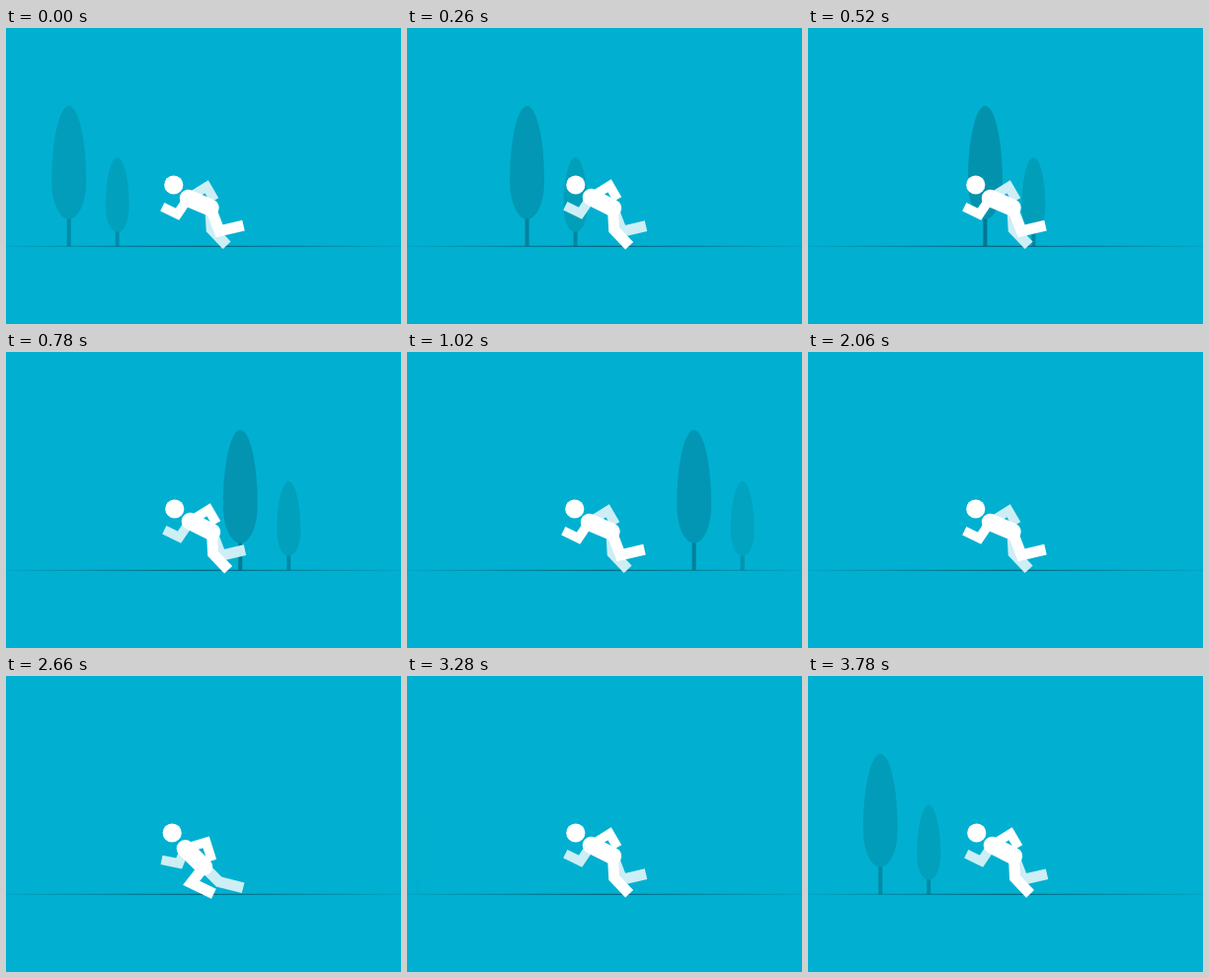
An HTML page with a canvas for the animation above (3800 ms loop, 400x300 px).

```html
<!DOCTYPE html>
<html lang="en">
<head>
<meta charset="utf-8">
<title>Runner</title>
<style>
  html, body { margin: 0; width: 100%; height: 100%; overflow: hidden; background: #01b0d0; }
  canvas { display: block; width: 400px; height: 300px; }
</style>
</head>
<body>
<canvas id="stage"></canvas>
<script>
const LOOP = 3800, STRIDE = 505, STRIDE_START = 30, REST = 0.06;
const SPEED = 0.2225, TREE_START = 63.5, TREE_SPAN = 831.5, TREE_GAP = 49;
const BACKGROUND = '#01b0d0', NEAR = '#ffffff', FAR = '#cdeef5';

// Four poses per stride: lift-off, passing, landing, pushing.
const TIMES = [0, 0.15, 0.5, 0.65, 1];
const BODY = {
  headX: [169.8, 168, 170.8, 168], headY: [159, 159, 159, 159],
  shoulderX: [184.5, 181, 186.5, 181], shoulderY: [172.5, 175, 171.5, 175],
  hipX: [207, 200, 208.5, 200], hipY: [182, 194, 182.5, 194]
};
// Each limb: upper angle and length, lower angle and length.
const ARM = [[124, -4, -32, 100], [19.5, 22, 22, 16.5], [206, 84, 60, 180], [17, 20, 16, 18]];
const LEG = [[69, 129, 87, 45], [25.5, 21, 22, 21], [-13, 20, 46.5, 20], [25, 25.5, 22.5, 25]];
const FADE = [[5, 0], [63, 0.62], [180, 1], [290, 0.83], [371, 0.53], [500, 0]];

const canvas = document.getElementById('stage');
const ctx = canvas.getContext('2d');
const ratio = window.devicePixelRatio || 1;
canvas.width = 400 * ratio;
canvas.height = 300 * ratio;
ctx.scale(ratio, ratio);

const ground = ctx.createLinearGradient(0, 0, 400, 0);
ground.addColorStop(0, 'rgba(0,82,104,0.1)');
ground.addColorStop(0.5, 'rgba(0,82,104,0.75)');
ground.addColorStop(1, 'rgba(0,82,104,0.1)');

// Pauses briefly at the two extremes of the stride.
function restAtExtremes(phase) {
  const half = Math.floor(phase * 2) / 2;
  const u = (phase - half - REST) / (0.5 - 2 * REST);
  return half + 0.5 * Math.min(1, Math.max(0, u));
}

// Hermite curve that is level at both extremes and flows through the other poses.
function pose(values, phase) {
  const p = phase - Math.floor(phase);
  let i = 0;
  while (p >= TIMES[i + 1]) i++;
  const a = values[i], b = values[(i + 1) % 4], before = values[(i + 3) % 4], after = values[(i + 2) % 4];
  const span = TIMES[i + 1] - TIMES[i], u = (p - TIMES[i]) / span;
  const slopeA = i % 2 ? (b - before) * span / 0.5 : 0;
  const slopeB = i % 2 ? 0 : (after - a) * span / 0.5;
  const s = u * u * (3 - 2 * u);
  return a + (b - a) * s + slopeA * u * (1 - u) * (1 - u) - slopeB * u * u * (1 - u);
}

function fade(x) {
  for (let i = 1; i < FADE.length; i++) {
    const [x0, a0] = FADE[i - 1], [x1, a1] = FADE[i];
    if (x >= x0 && x < x1) return a0 + (a1 - a0) * (x - x0) / (x1 - x0);
  }
  return 0;
}

function drawTree(x, top, widest, bottom, halfWidth, crown, trunk) {
  ctx.globalAlpha = fade(x);
  ctx.fillStyle = crown;
  ctx.beginPath();
  ctx.ellipse(x, widest, halfWidth, widest - top, 0, Math.PI, 2 * Math.PI);
  ctx.ellipse(x, widest, halfWidth, bottom - widest, 0, 0, Math.PI);
  ctx.fill();
  ctx.fillStyle = trunk;
  ctx.fillRect(x - 2, bottom - 0.5, 4, 221.5 - bottom);
  ctx.globalAlpha = 1;
}

function drawLimb(x, y, limb, phase, width, color) {
  const [upper, upperLength, lower, lowerLength] = limb.map(values => pose(values, phase));
  const step = (angle, length) => {
    x += Math.cos(angle * Math.PI / 180) * length;
    y += Math.sin(angle * Math.PI / 180) * length;
    ctx.lineTo(x, y);
  };
  ctx.strokeStyle = color;
  ctx.lineWidth = width;
  ctx.lineCap = 'butt';
  ctx.lineJoin = 'miter';
  ctx.beginPath();
  ctx.moveTo(x, y);
  step(upper, upperLength);
  step(lower, lowerLength);
  ctx.stroke();
}

function drawRunner(phase) {
  const at = name => pose(BODY[name], phase);
  const shoulder = [at('shoulderX'), at('shoulderY')];
  const hip = [at('hipX'), at('hipY')];
  const limbs = (offset, color) => {
    drawLimb(...hip, LEG, phase + offset, 11, color);
    drawLimb(...shoulder, ARM, phase + offset, 9.5, color);
  };
  limbs(0.5, FAR);
  limbs(0, NEAR);

  ctx.strokeStyle = ctx.fillStyle = NEAR;
  ctx.lineWidth = 17.5;
  ctx.lineCap = 'round';
  ctx.beginPath();
  ctx.moveTo(...shoulder);
  ctx.lineTo(...hip);
  ctx.stroke();
  ctx.beginPath();
  ctx.arc(at('headX'), at('headY'), 9.6, 0, 2 * Math.PI);
  ctx.fill();
}

function draw(now) {
  const t = now % LOOP;
  ctx.fillStyle = BACKGROUND;
  ctx.fillRect(0, 0, 400, 300);

  let x = TREE_START + SPEED * t;
  if (x > 520) x -= TREE_SPAN;
  drawTree(x + TREE_GAP, 131, 181, 207, 12, '#029db9', '#0283a0');
  drawTree(x, 79, 155, 194, 17.5, '#0392ae', '#027690');

  ctx.fillStyle = ground;
  ctx.fillRect(0, 220.7, 400, 1.3);
  drawRunner(restAtExtremes((t - STRIDE_START) / STRIDE));
}

const start = performance.now();
function tick() {
  draw(performance.now() - start);
  requestAnimationFrame(tick);
}
tick();
</script>
</body>
</html>
```
